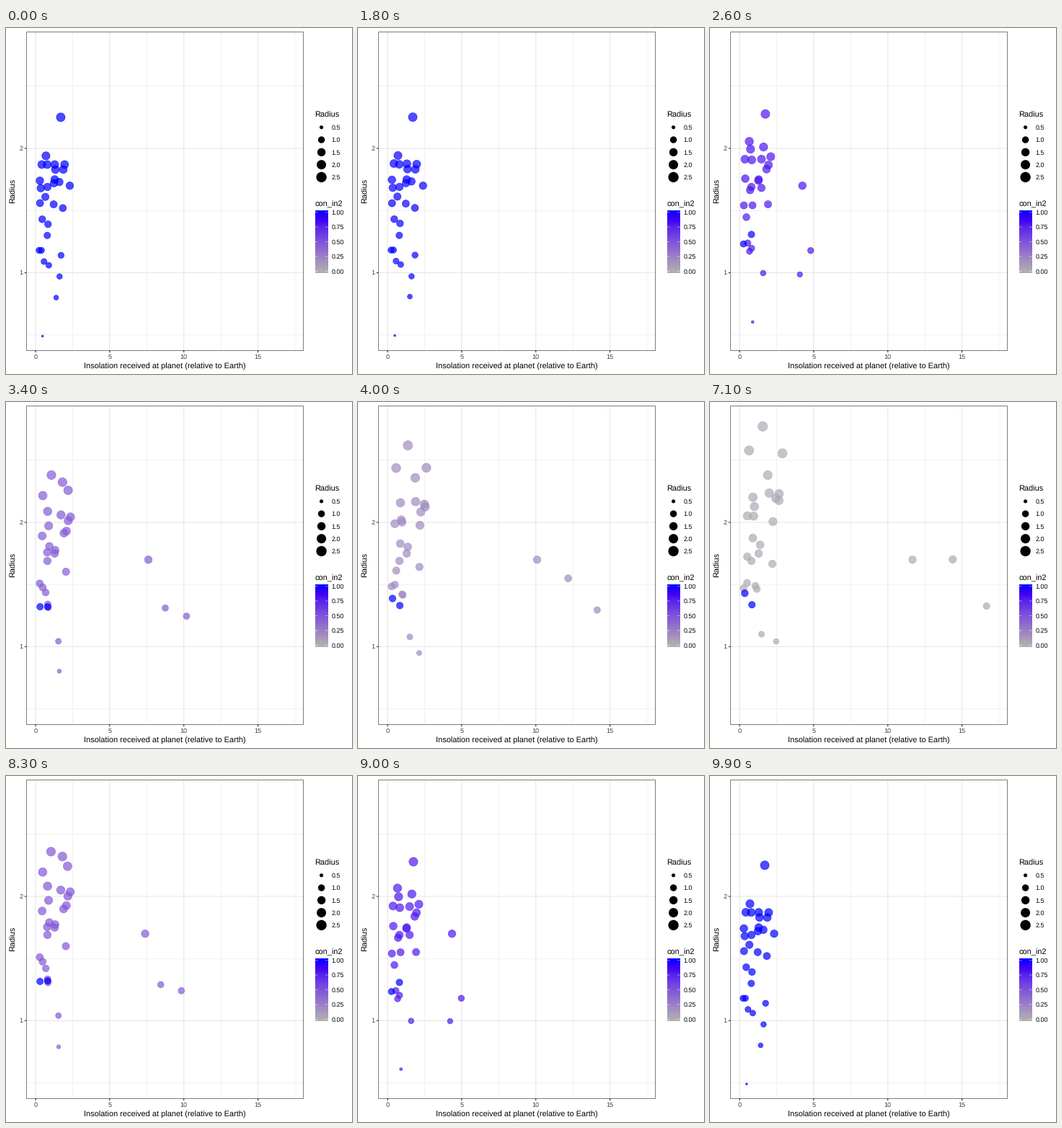
Recreate the animation shown at these times as a matplotlib script. Size 480 by 480 pixels, loop 10000 ms.

```python
import numpy as np
import matplotlib.pyplot as plt
from matplotlib.animation import FuncAnimation
from matplotlib.patches import Rectangle

plt.rcParams.update({"font.family": "Liberation Sans", "text.hinting": "none",
                     "text.hinting_factor": 1})

SIZE, DPI = 480, 72
FRAMES, INTERVAL = 100, 100
LEFT, RIGHT, TOP, BOTTOM = 28, 412, 5, 447
R_MIN, R_MAX = 0.49, 2.82

# Star radius correction -> planets as (insolation, radius[, extra heating]).
# A star k times larger makes its planets k times larger and k**2 times hotter.
LEAVING = {
    0.94: [(0.30, 1.56)],
    1.00: [(1.29, 1.75), (0.80, 1.69), (2.31, 1.70, 5.2)],
    1.06: [(1.70, 2.25), (1.24, 1.72), (0.45, 1.43)],
    1.10: [(0.79, 1.87), (1.87, 1.83), (1.84, 1.52)],
    1.14: [(0.70, 1.94), (1.62, 0.97, 0.7)],
    1.17: [(1.96, 1.87), (0.66, 1.61), (1.72, 1.14, 7.31)],
    1.23: [(1.34, 1.83), (0.35, 1.68)],
    1.25: [(0.39, 1.18, 1.95)],
    1.30: [(1.60, 1.73)],
    1.38: [(1.29, 1.87, 1.2), (0.57, 1.09)],
    1.43: [(1.22, 1.55)],
    1.50: [(0.42, 1.87, 1.7), (0.29, 1.74)],
    1.55: [(0.84, 1.39, 0.5)],
    1.65: [(0.89, 1.06, 0.21)],
    2.17: [(1.39, 0.80, 2.27), (0.47, 0.49, 1.15)],
}
STAYING = {1.03: [(0.79, 1.30)], 1.22: [(0.24, 1.18)]}


def expand(groups):
    """Rows of insolation and radius before and after the correction."""
    return [(x, r, x * k ** 2 * (heat[0] if heat else 1), r * k)
            for k, planets in groups.items() for x, r, *heat in planets]


def xyz_matrix(*primaries):
    """Linear RGB to XYZ for three chromaticities and a D65 white."""
    def xyz(x, y):
        return np.array([x / y, 1, (1 - x - y) / y])
    m = np.column_stack([xyz(*p) for p in primaries])
    return m * np.linalg.solve(m, xyz(0.3127, 0.3290))


SRGB = xyz_matrix((0.64, 0.33), (0.30, 0.60), (0.15, 0.06))
GENERIC = xyz_matrix((0.6295, 0.3407), (0.2949, 0.6055), (0.1551, 0.0762))
WHITE = SRGB.sum(axis=1)


def to_xyz(rgb):
    c = np.asarray(rgb, float)
    return SRGB @ np.where(c > 0.04045, ((c + 0.055) / 1.055) ** 2.4, c / 12.92)


def to_lab(rgb):
    v = to_xyz(rgb) / WHITE
    f = np.where(v > 0.008856, np.cbrt(v), 7.787 * v + 16 / 116)
    return np.array([116 * f[1] - 16, 500 * (f[0] - f[1]), 200 * (f[1] - f[2])])


def lab_to_xyz(lab):
    fy = (lab[0] + 16) / 116
    f = np.array([fy + lab[1] / 500, fy, fy - lab[2] / 200])
    return np.where(f > 0.2069, f ** 3, (f - 16 / 116) / 7.787) * WHITE


def device(xyz):
    """Colour as written by a gamma 1.8 display device."""
    return np.clip(np.linalg.solve(GENERIC, xyz), 0, 1) ** (1 / 1.8)


def grey(level):
    return device(to_xyz([level] * 3))


LAB_IN, LAB_OUT = to_lab((0, 0, 1)), to_lab([190 / 255] * 3)
GRID, INK, SOFT = grey(0.92), grey(0.2), grey(0.3)


def zone_color(value):
    return device(lab_to_xyz(LAB_OUT + (LAB_IN - LAB_OUT) * value))


def px(x):
    return 41 + 20.57 * x


def py(r):
    return 339.5 - 172.5 * (r - 1)


def point_size(r):
    return 1 + 5 * np.sqrt((r - R_MIN) / (R_MAX - R_MIN))


def area(size, pad=0):
    radius = 0.375 * (size * 2.845 + 0.945) + pad
    return (2 * radius) ** 2


def progress(i):
    """Share of the way to the second state, with sine easing."""
    if i <= 50:
        t = max(i - 16, 0) / 34
    else:
        t = 1 - max(i - 67, 0) / 33
    return (1 - np.cos(np.pi * t)) / 2


fig = plt.figure(figsize=(SIZE / DPI, SIZE / DPI), dpi=DPI, facecolor="white")
ax = fig.add_axes([0, 0, 1, 1])
ax.axis("off")


def line(x0, y0, x1, y1, color, width, z=1):
    ax.plot([x0, x1], [y0, y1], color=color, lw=width, zorder=z,
            solid_capstyle="butt", snap=False)


def label(x, y, text, size=8.8, color="black", **kw):
    ax.text(x, y, text, fontsize=size, color=color, **{"va": "baseline", **kw})


def draw_panel():
    for x in np.arange(2.5, 18, 5):
        line(px(x), TOP, px(x), BOTTOM, GRID, 0.53)
    for r in (0.5, 1.5, 2.5):
        line(LEFT, py(r), RIGHT, py(r), GRID, 0.53)
    for x in range(0, 16, 5):
        line(px(x), TOP, px(x), BOTTOM, GRID, 1.07)
        line(px(x), BOTTOM, px(x), BOTTOM + 3.2, INK, 1.07)
        label(px(x), 459, str(x), color=SOFT, ha="center")
    for r in (1, 2):
        line(LEFT, py(r), RIGHT, py(r), GRID, 1.07)
        line(LEFT - 2.3, py(r), LEFT, py(r), INK, 1.07)
        label(23.5, py(r) + 3, str(r), color=SOFT, ha="right")
    ax.add_patch(Rectangle((LEFT, TOP), RIGHT - LEFT, BOTTOM - TOP, fill=False,
                           ec=INK, lw=0.6, zorder=4))
    label(220.5, 472.5, "Insolation received at planet (relative to Earth)", 11,
          ha="center")
    label(15.6, 225.7, "Radius", 11, rotation=90, ha="right", va="center")


def draw_legends():
    label(428.5, 123.5, "Radius", 11)
    radii = np.arange(0.5, 2.6, 0.5)
    ys = 137.8 + 17.28 * np.arange(5)
    ax.scatter(np.full(5, 437.6), ys, s=area(point_size(radii), 0.8), c="black",
               lw=0)
    for r, y in zip(radii, ys):
        label(451.5, y + 3.2, f"{r:.1f}")

    label(428.5, 248, "con_in2", 11)
    x0, x1, y0, y1 = 429, 446.3, 253.3, 339.7
    bar = np.array([[zone_color(v)] for v in np.linspace(1, 0, 20)])
    ax.imshow(bar, extent=(x0, x1, y1, y0), interpolation="bilinear",
              aspect="auto", zorder=2)
    half = (y1 - y0) / 40
    for v in np.linspace(0, 1, 5):
        y = y1 - half - v * (y1 - y0 - 2 * half)
        line(x0, y, x0 + 3.46, y, "white", 0.5, 3)
        line(x1 - 3.46, y, x1, y, "white", 0.5, 3)
        label(451.5, y + 3.2, f"{v:.2f}")


draw_panel()
draw_legends()
ax.set_xlim(0, SIZE)
ax.set_ylim(SIZE, 0)

leaving, staying = expand(LEAVING), expand(STAYING)
x_a, r_a, x_b, r_b = np.array(leaving + staying).T
dots = ax.scatter(px(x_a), py(r_a), s=area(point_size(r_a)), lw=0.71, zorder=3)


def update(i):
    p = progress(i)

    def mix(a, b):
        return a + (b - a) * p

    dots.set_offsets(np.column_stack([px(mix(x_a, x_b)), py(mix(r_a, r_b))]))
    dots.set_sizes(area(mix(point_size(r_a), point_size(r_b))))
    colors = ([[*zone_color(1 - p), 0.7]] * len(leaving)
              + [[*zone_color(1), 0.7]] * len(staying))
    dots.set_facecolors(colors)
    dots.set_edgecolors(colors)
    return [dots]


anim = FuncAnimation(fig, update, frames=FRAMES, interval=INTERVAL,
                     init_func=lambda: update(0), repeat=True, repeat_delay=0)
plt.show()
```
